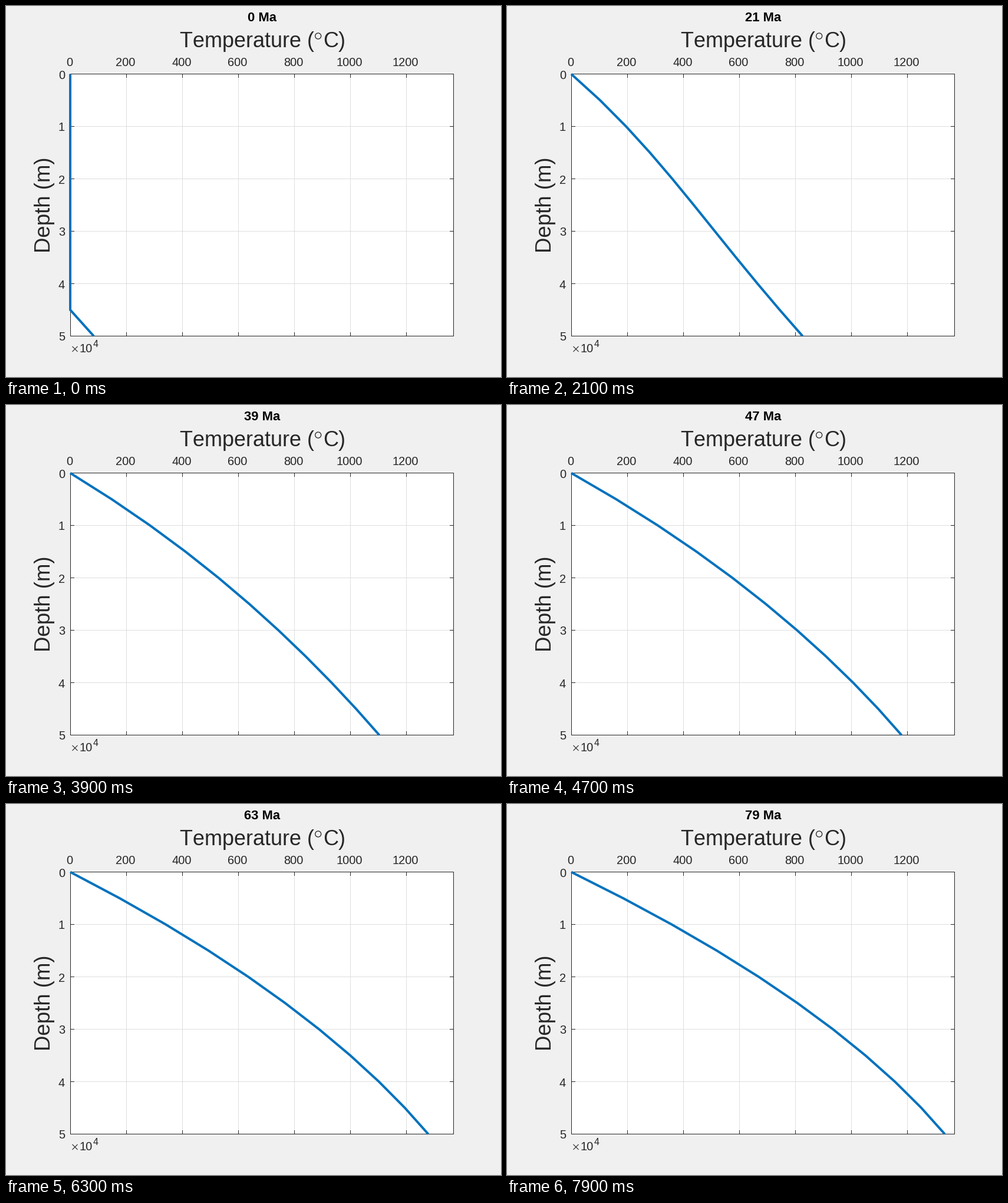
A matplotlib script for the animation above (8000 ms loop, 840 px wide and 630 px high).

```python
import numpy as np
import matplotlib.pyplot as plt
from matplotlib.animation import FuncAnimation
from matplotlib.patches import Circle, Rectangle

W, H, DPI = 840, 630, 100
PX = 72 / DPI                       # points per pixel
LEFT, RIGHT, TOP, BOTTOM = 109.5, 759.5, 115.5, 560.5
PX_PER_DEG = 0.475
INK, GRID, BLUE = "#262626", "#DEDEDE", "#0072BD"

# Heat conduction in a 50 km column: temperature 0 at the surface,
# fixed heat flow at the base and uniform internal heating.
NODES, DZ = 11, 5.0                 # km
KAPPA = 34.2                        # km^2 per Ma
BASE_STEP = 84.0                    # degrees across the lowest cell
HEATING = 12.55                     # degrees, scaled by DZ^2 / KAPPA
FRAMES, SUBSTEPS = 80, 10


def solve():
    r = KAPPA / SUBSTEPS / DZ**2
    temp = np.zeros(NODES)
    temp[-1] = BASE_STEP
    states = []
    for step in range(FRAMES * SUBSTEPS):
        if step % SUBSTEPS == 0:
            states.append(temp)
        new = temp.copy()
        new[1:-1] += r * (temp[2:] - 2 * temp[1:-1] + temp[:-2] + HEATING)
        new[-1] = temp[-2] + BASE_STEP
        temp = new
    return states


fig = plt.figure(figsize=(W / DPI, H / DPI), dpi=DPI, facecolor="#F0F0F0")
ax = fig.add_axes([0, 0, 1, 1])
ax.set_xlim(0, W)
ax.set_ylim(H, 0)
ax.axis("off")


def label(x, y, text, size, ha="center", color=INK, **kw):
    return ax.text(x, y, text, fontsize=size * PX, family="Liberation Sans",
                   ha=ha, va="baseline", color=color, **kw)


def stroke(xs, ys, color=INK, width=1, z=2, **kw):
    return ax.plot(xs, ys, color=color, lw=width * PX, zorder=z, snap=False,
                   solid_capstyle="butt", **kw)[0]


ax.add_patch(Rectangle((LEFT, TOP), RIGHT - LEFT, BOTTOM - TOP,
                       fc="white", ec="none", zorder=0, snap=False))

TICK = 6.5
for i in range(7):
    x = LEFT + 95 * i
    if i:
        stroke([x, x], [TOP, BOTTOM], GRID, z=1)
    stroke([x, x], [TOP, TOP + TICK])
    stroke([x, x], [BOTTOM - TICK, BOTTOM])
    label(x - 1.5, 102, str(200 * i), 20)

for i in range(6):
    y = TOP + 89 * i
    if 0 < i < 5:
        stroke([LEFT, RIGHT], [y, y], GRID, z=1)
    stroke([LEFT, LEFT + TICK], [y, y])
    stroke([RIGHT - TICK, RIGHT], [y, y])
    label(100, y + 8, str(i), 20, ha="right")

for y in (TOP, BOTTOM):
    stroke([LEFT - 0.5, RIGHT + 0.5], [y, y])
for x in (LEFT, RIGHT):
    stroke([x, x], [TOP, BOTTOM])

# Axis titles; the T stands apart so that it is not kerned
label(294, 70, "T", 36, ha="left")
label(317, 70, "emperature (", 36, ha="left")
ax.add_patch(Circle((529.7, 51), 5, fc="none", ec=INK, lw=1.3 * PX))
label(576.5, 70, "C)", 36, ha="right")
label(75, 338, "Depth (m)", 36.67, rotation=90, rotation_mode="anchor")

# Depth multiplier
for ys in ((578, 587), (587, 578)):
    stroke([112.5, 121.5], ys, width=1.1)
label(125, 588, "10", 20, ha="left")
label(147.5, 579, "4", 16, ha="left")

title = label(435, 26, "0 Ma", 22, color="black", weight="bold")
curve = stroke(np.full(NODES, 109.0), np.linspace(TOP, BOTTOM, NODES),
               BLUE, 4, z=3, solid_joinstyle="round")
profiles = solve()


def update(frame):
    title.set_text(f"{frame} Ma")
    curve.set_xdata(109 + PX_PER_DEG * profiles[frame])
    return curve, title


anim = FuncAnimation(fig, update, frames=FRAMES, interval=100,
                     init_func=lambda: update(0), repeat=True, repeat_delay=0)
plt.show()
```
